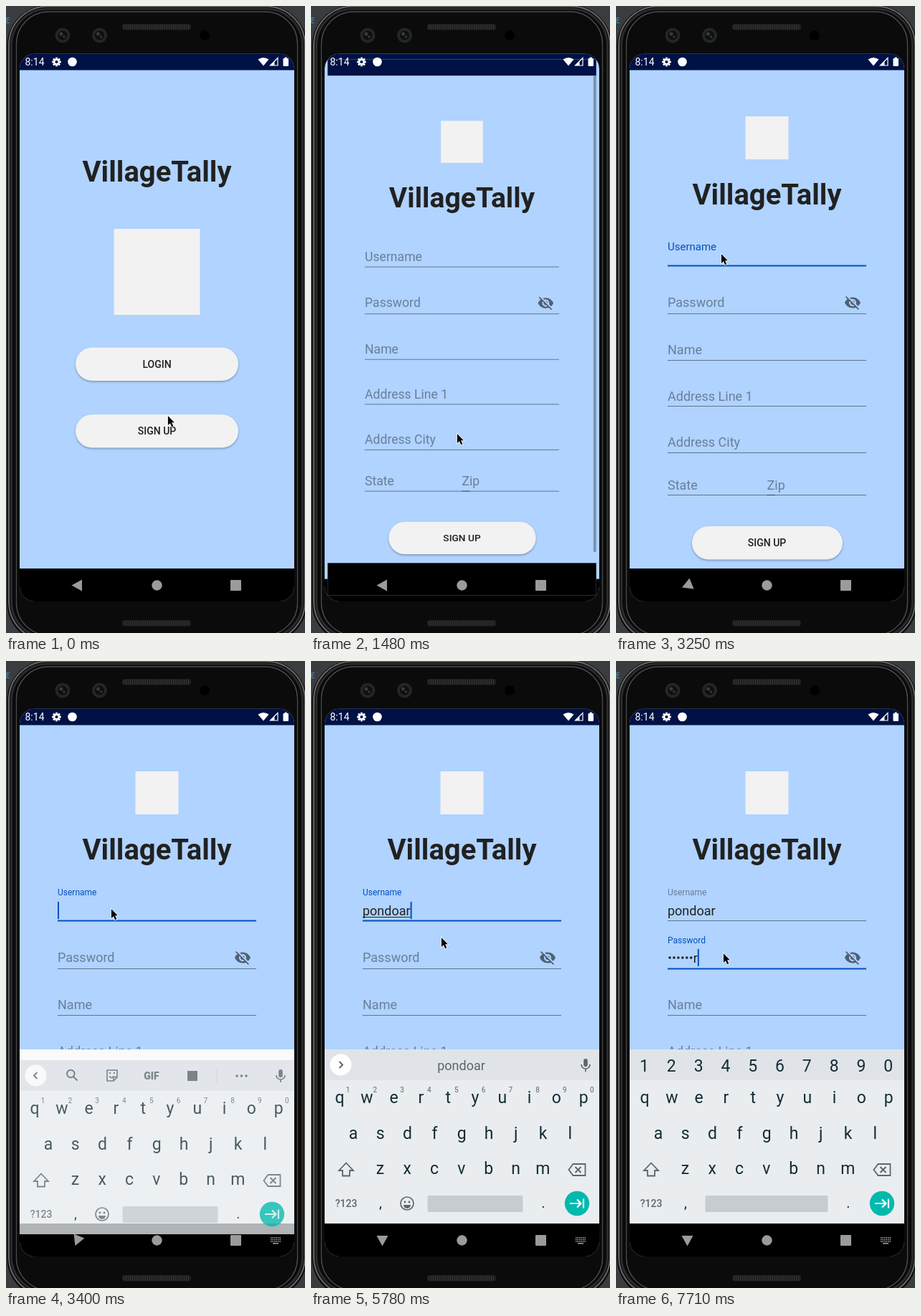
These frames come from a looping animation (417x875 px, 8 s). An HTML page with a canvas:

```html
<!DOCTYPE html>
<html lang="en">
<head>
<meta charset="utf-8">
<title>Sign up demo</title>
<style>
html, body { margin: 0; width: 100%; height: 100%; overflow: hidden; background: #000; }
canvas { display: block; width: 417px; height: 875px; }
</style>
</head>
<body>
<canvas id="stage" width="417" height="875"></canvas>
<script>
const ctx = document.getElementById('stage').getContext('2d');
const LOOP = 8000, STEPS = 54, CX = 210.5, CY = 437;
const SKY = '#b0d3ff', NAVY = '#001145', BLUE = '#0350bd', PALE = '#f2f2f2';
const HINT = 'rgba(0,0,0,.4)', GREY = '#5c666c', KEY = '#152c35', NAV_GREY = '#9b9b9b';
const APP = 'VillageTally', USER = 'pondoar';

const lerp = (a, b, k) => a + (b - a) * k;
const clamp = v => Math.max(0, Math.min(1, v));

function rect(x, y, w, h, color) {
  ctx.fillStyle = color;
  ctx.fillRect(x, y, w, h);
}
function round(x, y, w, h, r, color) {
  ctx.fillStyle = color;
  ctx.beginPath();
  ctx.roundRect(x, y, w, h, r);
  ctx.fill();
}
function ring(x, y, w, h, r, color, width = 1) {
  ctx.strokeStyle = color;
  ctx.lineWidth = width;
  ctx.beginPath();
  ctx.roundRect(x, y, w, h, r);
  ctx.stroke();
}
function disc(x, y, r, color) {
  ctx.fillStyle = color;
  ctx.beginPath();
  ctx.arc(x, y, r, 0, 7);
  ctx.fill();
}
function text(s, x, y, size, color, align = 'left', weight = 400) {
  ctx.font = `${weight} ${size}px Roboto, sans-serif`;
  ctx.textAlign = align;
  ctx.fillStyle = color;
  ctx.fillText(s, x, y);
}
// SVG path placed with its own origin at (x, y)
function icon(d, x, y, color, scale = 1, width = 0) {
  ctx.save();
  ctx.translate(x, y);
  ctx.scale(scale, scale);
  const path = new Path2D(d);
  if (width) {
    ctx.strokeStyle = color;
    ctx.lineWidth = width;
    ctx.stroke(path);
  } else {
    ctx.fillStyle = color;
    ctx.fill(path);
  }
  ctx.restore();
}

const EYE_OFF = 'M12 7c2.76 0 5 2.24 5 5 0 .65-.13 1.26-.36 1.83l2.92 2.92c1.51-1.26 2.7-2.89 3.43-4.75' +
  '-1.73-4.39-6-7.5-11-7.5-1.4 0-2.74.25-3.98.7l2.16 2.16C10.74 7.13 11.35 7 12 7z' +
  'M2 4.27l2.74 2.74C3.08 8.3 1.78 10.02 1 12c1.73 4.39 6 7.5 11 7.5 1.55 0 3.03-.3 4.38-.84' +
  'L19.73 22 21 20.73 3.27 3z' +
  'M7.53 9.8l1.55 1.55c-.05.21-.08.43-.08.65 0 1.66 1.34 3 3 3 .22 0 .44-.03.65-.08l1.55 1.55' +
  'c-.67.33-1.41.53-2.2.53-2.76 0-5-2.24-5-5 0-.79.2-1.53.53-2.2z' +
  'm4.31-.78l3.15 3.15.02-.16c0-1.66-1.34-3-3-3z';

// Pointer positions by step; straight runs between them
const POINTER = [
  [0, 225, 571], [3, 203, 597], [4, 203, 597], [5, 214, 586], [7, 203, 596], [13, 203, 596],
  [14, 228, 617], [16, 256, 629], [17, 243, 580], [18, 208, 465], [19, 170, 385], [21, 146, 345],
  [24, 146, 345], [27, 181, 385], [39, 181, 385], [42, 149, 407], [54, 149, 407]
];
function pointerAt(step) {
  const i = POINTER.findIndex(p => p[0] > step);
  const [s0, x0, y0] = POINTER[i - 1], [s1, x1, y1] = POINTER[i];
  const k = (step - s0) / (s1 - s0);
  return [lerp(x0, x1, k), lerp(y0, y1, k)];
}

// [step, letters] pairs for each field
const NAME_TYPING = [[32, 1], [33, 2], [34, 3], [35, 4], [37, 6], [38, 7]];
const PASS_TYPING = [[45, 1], [46, 3], [50, 4], [51, 6], [52, 7]];
const typed = (rule, step) => rule.reduce((n, [s, count]) => step >= s ? count : n, 0);

function drawPhone() {
  rect(0, 0, 417, 875, '#3a3d3f');
  text('IE', -3, 24, 10, '#4b8fc0');
  round(1.5, -1, 418, 890, 56, '#0a0a0a');
  ring(4, .5, 413, 885, 54, '#686868', 2);
  ring(7.5, 4, 406, 878, 51, '#2b2b2b', 3);
  ring(14.5, 8, 392, 870, 45, '#4c4c4c', 1.4);
  round(15.5, 9, 390, 868, 44, '#0b0b0b');
  for (const y of [25, 857]) {
    round(162, y, 96, 8.5, 4, '#202020');
    for (let x = 164; x < 256; x += 3) rect(x, y + 1, 1, 6.5, '#323232');
  }
  for (const x of [79, 130.5]) {
    disc(x, 41, 10.5, '#232526');
    disc(x, 41, 6.5, '#0d0f10');
    disc(x - 2, 39, 2.5, '#353b3f');
    disc(x + 2, 43, 1.8, '#30363a');
  }
  disc(277, 41, 7, '#000');
}

function drawBackdrop() {
  rect(19, 66.5, 383, 764.5, SKY);
  rect(19, 66.5, 383, 23, NAVY);
  rect(19, 785, 383, 46, '#000');
}

function drawButton(label, x, y, w) {
  ctx.save();
  ctx.shadowColor = 'rgba(0,0,0,.3)';
  ctx.shadowBlur = 3;
  ctx.shadowOffsetY = 1.5;
  round(x, y, w, 46.5, 23.2, PALE);
  ctx.restore();
  text(label, CX, y + 28.3, 14, '#1f1f1f', 'center', 500);
}

function drawTitle(y) {
  text(APP, CX, y, 40, '#212121', 'center', 700);
}

function drawWelcome() {
  drawBackdrop();
  drawTitle(245);
  rect(150.5, 311, 120, 120, PALE);
  drawButton('LOGIN', 97, 476.5, 227);
  drawButton('SIGN UP', 97, 570, 227);
}

function drawField(label, x, baseline, lineY, right, { lift = 0, active = false } = {}) {
  const color = active ? BLUE : HINT;
  text(label, x, lerp(baseline, lineY - 35.5, lift), lerp(18, 12, lift), color);
  rect(x, lineY - (active ? 1 : .5), right - x, active ? 2 : 1, active ? BLUE : 'rgba(0,0,0,.45)');
}
const drawCaret = (x, y) => rect(x, y, 2, 24, BLUE);

function drawForm(step) {
  drawBackdrop();
  rect(180.5, 154, 60, 60, PALE);
  drawTitle(277);

  const name = USER.slice(0, typed(NAME_TYPING, step));
  const count = typed(PASS_TYPING, step);
  const onName = step >= 22 && step < 43, onPass = step >= 43;
  drawField('Username', 72, 354, 362.5, 349, { lift: clamp((step - 21) / 2), active: onName });
  drawField('Password', 72, 420, 429.5, 349, { lift: clamp((step - 42) / 2), active: onPass });
  drawField('Name', 72, 486, 494.5, 349);
  drawField('Address Line 1', 72, 550.5, 558.5, 349);
  drawField('Address City', 72, 615, 623.5, 349);
  drawField('State', 72, 674.5, 682.5, 222);
  drawField('Zip', 210.5, 674.5, 682.5, 349);
  icon(EYE_OFF, 318, 402, 'rgba(0,0,0,.54)');

  text(name, 72, 355, 18, '#212121');
  const nameWidth = ctx.measureText(name).width;
  if (onName) {
    if (name) rect(72, 357, nameWidth, 1, '#212121');
    const blinkOff = step >= 26 && step < 29;
    if (step > 22 && !blinkOff) drawCaret(72 + nameWidth, 336);
  }
  if (onPass) {
    for (let i = 0; i < count - 1; i++) disc(75 + i * 5.95, 414, 1.8, '#212121');
    const x = 72 + Math.max(0, count - 1) * 5.95;
    const last = count ? USER[count - 1] : '';
    text(last, x, 420.5, 18, '#212121');
    if (step > 43) drawCaret(x + ctx.measureText(last).width, 402);
  }
  drawButton('SIGN UP', 106, 726, 210);

  const bar = clamp((19 - step) / 3);
  if (bar) rect(398, 89.5, 4, 679.5, `rgba(80,95,115,${.56 * bar})`);
}

function drawMic() {
  round(380.2, 555, 5.6, 11, 2.8, GREY);
  icon('M-6 0a6 6 0 0 0 12 0M0 6v4', 383, 563, GREY, 1, 1.7);
}

function drawToolbar(word) {
  disc(41.5, 563.5, 15, '#fff');
  drawMic();
  if (word) {
    icon('M-2 -4.5L2.5 0L-2 4.5', 41.5, 563.5, GREY, 1, 2);
    text(word, 209.5, 571, 18, GREY, 'center');
    return;
  }
  icon('M2 -4.5L-2.5 0L2 4.5', 41.5, 563.5, GREY, 1, 2);
  icon('M4 -2a5.2 5.2 0 1 0 -10.4 0a5.2 5.2 0 1 0 10.4 0M2.5 2L8 7.5', 91.5, 563, GREY, 1, 2);
  icon('M-7 -7.5h14v10l-5 5h-9zM7 2h-5v5M-4 1q3 4 6 0', 148, 563.5, GREY, 1, 1.6);
  rect(144, 559, 2, 2, GREY);
  rect(150, 559, 2, 2, GREY);
  text('GIF', 203, 568.5, 14, GREY, 'center', 900);
  rect(253, 557, 14, 14, GREY);
  rect(294, 553, 1, 21, '#cbd0d3');
  for (const x of [322, 328.5, 335]) disc(x, 564, 1.8, GREY);
}

function drawKeyRow(letters, x, y) {
  [...letters].forEach((c, i) => text(c, x + i * 37.8, y, 23, KEY, 'center'));
}

function drawKeyboard(word, secret) {
  rect(19, 542, 383, 243, '#e9edf0');
  rect(19, 542, 383, 43, '#e0e4e8');
  if (secret) drawKeyRow('1234567890', 39.5, 573);
  else {
    drawToolbar(word);
    [...'1234567890'].forEach((c, i) => text(c, 51.5 + i * 37.8, 602, 10, GREY, 'center'));
  }
  drawKeyRow('qwertyuiop', 40, 617);
  drawKeyRow('asdfghjkl', 59, 667);
  drawKeyRow('zxcvbnm', 96.5, 716);
  icon('M0 -9.5L10 1H5V8.5H-5V1H-10Z', 49, 710, GREY, 1, 1.8);
  icon('M-12 0L-6 -8H11V8H-6ZM-3 -4L5 4M5 -4L-3 4', 371.5, 710, GREY, 1, 1.8);
  text('?123', 49, 762, 14, GREY, 'center', 500);
  text(',', 97, 763, 20, KEY, 'center');
  text('.', 324, 763, 20, KEY, 'center');
  const left = secret ? 124.5 : 162.5;
  round(left, 746, 295.5 - left, 23, 2, '#c7ccd0');
  if (!secret) {
    ring(125, 748, 18, 18, 9, GREY, 1.7);
    disc(131, 755, 1.4, GREY);
    disc(137, 755, 1.4, GREY);
    icon('M-5 1.5a5 5 0 0 0 10 0z', 134, 757.5, GREY);
  }
  disc(371, 757, 17.2, '#00b9ad');
  icon('M-10 0H5M0 -5.5L5.5 0L0 5.5M9 -6.5V6.5', 371, 757, '#fff', 1, 2.2);
}

function drawNavigation(step) {
  ctx.save();
  ctx.translate(99.5, 808.5);
  ctx.rotate(-Math.PI / 2 * clamp((step - 21.5) / 2));
  icon('M-8 0L6.5 -8V8Z', 0, 0, NAV_GREY);
  ctx.restore();
  disc(210.5, 808.5, 7.2, NAV_GREY);
  round(313, 801, 15, 15, 1, NAV_GREY);
  if (step >= 23) {
    for (let row = 0; row < 3; row++)
      for (let col = 0; col < 6; col++) rect(369 + col * 2.5, 804 + row * 2.7, 1.5, 1.6, NAV_GREY);
    rect(372, 812, 8, 1.6, NAV_GREY);
  }
}

function drawStatus() {
  text('8:14', 26.5, 83, 14, '#fff');
  for (let i = 0; i < 8; i++) {
    ctx.save();
    ctx.translate(70.5, 78);
    ctx.rotate(i * Math.PI / 4);
    rect(-1.4, -6.3, 2.8, 3, '#fff');
    ctx.restore();
  }
  ring(67.2, 74.7, 6.6, 6.6, 3.3, '#fff', 2.4);
  disc(92.5, 78, 6.3, '#fff');
  icon('M0 5.5L-7.5 -3.5Q0 -8.5 7.5 -3.5Z', 359, 78, '#fff');
  icon('M-5 5H5.5V-5.5Z', 373.5, 78, '#fff', 1, 1.2);
  icon('M-5 5H1V-1Z', 373.5, 78, '#fff');
  round(386.5, 73, 7.5, 11, 1, '#fff');
  rect(388.7, 71.5, 3, 2, '#fff');
}

function drawScaled(scale, draw) {
  ctx.save();
  ctx.translate(CX, CY);
  ctx.scale(scale, scale);
  ctx.translate(-CX, -CY);
  draw();
  ctx.restore();
}

function drawScreen(step) {
  ctx.save();
  ctx.beginPath();
  ctx.roundRect(19, 66.5, 383, 764.5, 21);
  ctx.clip();
  if (step < 10) drawWelcome();
  else if (step < 12) {
    drawScaled(step === 10 ? 1.042 : 1.046, drawWelcome);
    drawScaled(step === 10 ? .978 : .996, () => drawForm(step));
  } else drawForm(step);

  drawStatus();
  drawNavigation(step);
  if (step >= 23) {
    const secret = step >= 43;
    const word = USER.slice(0, typed(NAME_TYPING, step));
    const shift = step === 23 ? 15 : step === 24 ? 2 : 0;
    ctx.save();
    if (shift) {
      rect(19, 542, 383, 243, '#fafafa');
      ctx.globalAlpha = step === 23 ? .76 : .96;
      ctx.translate(0, shift);
    }
    drawKeyboard(word, secret);
    ctx.restore();
  }
  ctx.restore();
}

function drawPointer(step) {
  const [x, y] = pointerAt(step);
  const arrow = 'M1 1V15.5L4.4 12.4L6.8 18L9.2 17L6.8 11.5H11Z';
  icon(arrow, x, y, '#fff', .9, 1.6);
  icon(arrow, x, y, '#000', .9);
}

function frame(now) {
  const step = Math.floor((now % LOOP + 12) * STEPS / LOOP) % STEPS;
  drawPhone();
  drawScreen(step);
  drawPointer(step);
  requestAnimationFrame(frame);
}
requestAnimationFrame(frame);
</script>
</body>
</html>
```
